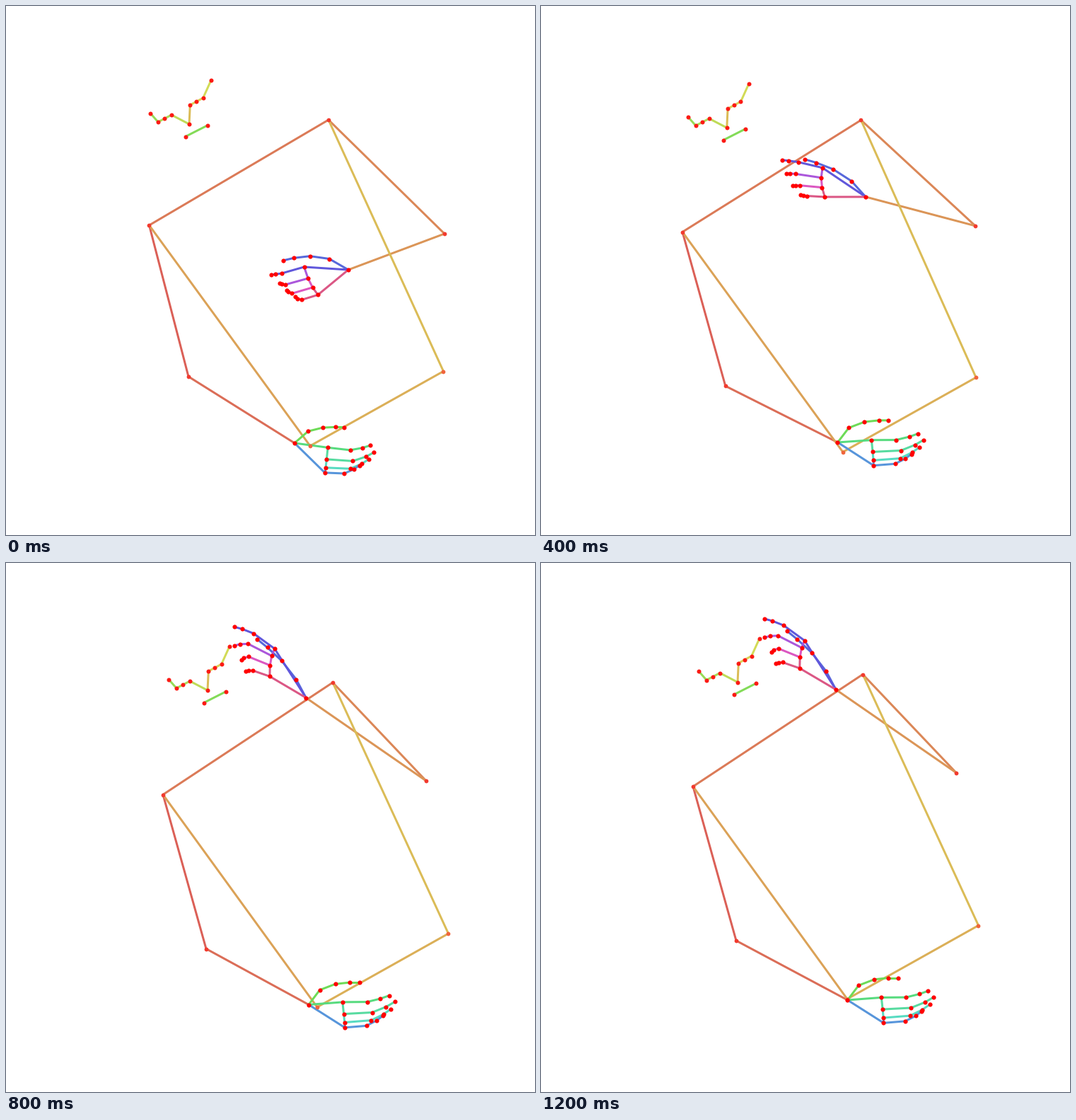
Animation of 748x748 px, one loop 1.28 s. Source, as a matplotlib script:

```python
import colorsys

import matplotlib.pyplot as plt
import numpy as np
from matplotlib.animation import FuncAnimation
from matplotlib.collections import LineCollection

SIZE, DPI = 748, 100
FRAMES, INTERVAL = 16, 80
PX = 72 / DPI

# The near shoulder carries the whole body; the resting wrist drifts by itself.
KEY_TIMES = [0, 3, 5, 7, 10, 13, 15]
SHOULDER_PATH = [(202.5, 310), (200, 315.5), (200, 319.5), (203.5, 314),
                 (222, 327.5), (219.5, 323.5), (215, 316)]
REST_WRIST_PATH = [(408, 618), (409.5, 617.5), (419.5, 617), (424, 618),
                   (428, 624.5), (434, 623), (433.5, 618)]

# Offsets from the nose: one eye to its ear, the other eye to its ear, mouth corners
FACE = np.array([(1.3, -27), (19.7, -37), (31, -62),
                 (-25, -13), (-44, -3), (-55, -15.5),
                 (-5, 17.5), (26.5, 1.5)])

# Thumb to little finger: knuckle distance and bearing from the wrist,
# finger length, heading, curl, share of the first segment
REST_HAND = np.array([
    (25.9, -53, 57.7, -21, 21, 0.41),
    (48, -4.3, 67, -0.5, -19, 0.52),
    (51.3, 14.8, 75.7, -3, -27, 0.53),
    (56.6, 26.3, 70, -4.5, -31, 0.54),
    (60.4, 32.4, 57.8, -4.7, -32, 0.53),
])
REST_TILT = np.array([-0.5, 12, -6, 7, -5, 0])
WAVE_LOW = np.array([
    (31, 210, 65.8, 188, -21, 0.42),
    (62.6, 183.7, 47.5, 164, 10, 0.68),
    (58.2, 168, 41.5, 164.5, 40, 0.81),
    (56.3, 153.7, 39.5, 163.7, 60, 0.77),
    (55.7, 140.5, 33.8, 163, 50, 0.71),
])
WAVE_HIGH = np.array([
    (29.4, 242, 79.5, 232, -13, 0.42),
    (82.2, 237.4, 65.7, 216, -21, 0.56),
    (76.5, 230.7, 56.7, 207, -42, 0.66),
    (68.4, 222, 44, 202, -58, 0.75),
    (59.5, 210.5, 35, 199, -32, 0.73),
])

LOW_WRIST, HIGH_WRIST = 2, 5
FACE_START, LOW_START, HIGH_START = 8, 17, 37
BODY_BONES = [(0, 1), (1, 2), (0, 3), (3, 4), (4, 5), (0, 6), (6, 7), (3, 7)]
FACE_BONES = [(8, 9), (9, 10), (10, 11), (8, 12), (12, 13), (13, 14), (15, 16)]
BODY_DOTS, HIP_DOTS = [0, 1, 3, 4], [6, 7]


def ease(frame, start, end):
    u = np.clip((frame - start) / (end - start), 0, 1)
    return u * u * (3 - 2 * u)


def mix(a, b, amount):
    return np.asarray(a) * (1 - amount) + np.asarray(b) * amount


def follow(path, frame):
    return np.array([np.interp(frame, KEY_TIMES, axis) for axis in zip(*path)])


def polar(length, degrees):
    angle = np.radians(degrees)
    return np.stack([length * np.cos(angle), length * np.sin(angle)], axis=-1)


def hand_points(wrist, hand):
    """Four joints per finger, each finger bending steadily towards its tip."""
    points = []
    for reach, bearing, length, heading, curl, share in hand:
        segments = length * np.array([share, 0.6 * (1 - share), 0.4 * (1 - share)])
        steps = polar(segments, heading + curl * np.array([0, 0.7, 1]))
        knuckle = wrist + polar(reach, bearing)
        points += [knuckle, *(knuckle + np.cumsum(steps, axis=0))]
    return points


def joints(frame):
    turn = ease(frame, 1, 5.5)
    lift = ease(frame, 4, 10)
    rise = ease(frame, 0.5, 8.8)
    sweep = ease(frame, 2.2, 10.2)

    shoulder = follow(SHOULDER_PATH, frame)
    elbow = shoulder + mix((55.5, 214), (61, 218), turn)
    rest_wrist = follow(REST_WRIST_PATH, frame)
    far_shoulder = shoulder + (253.5 - 13.5 * lift, -149 - 9.5 * turn)
    far_elbow = far_shoulder + (164 - 32 * lift, 161 - 11 * turn - 11 * lift)
    wave_wrist = shoulder + (281.5 - 79.5 * sweep, 63 - 200 * rise)
    hip = shoulder + mix((227.5, 312), (218, 300.5), lift)
    far_hip = hip + mix((188.5, -105.5), (185.5, -104), lift)
    nose = shoulder + mix((56.5, -143), (63, -147.5), turn)

    return np.array([
        shoulder, elbow, rest_wrist, far_shoulder, far_elbow, wave_wrist, hip, far_hip,
        nose, *(nose + FACE),
        *hand_points(rest_wrist, REST_HAND + REST_TILT * (1 - turn)),
        *hand_points(wave_wrist, mix(WAVE_LOW, WAVE_HIGH, rise)),
    ])


def hand_bones(wrist, start):
    """Five bones for each finger: a palm bone, three segments and an edge to the wrist."""
    bones = []
    for finger in range(5):
        knuckle = start + 4 * finger
        bones.append((wrist if finger < 2 else knuckle - 4, knuckle))
        bones += [(knuckle + j, knuckle + j + 1) for j in range(3)]
    return bones + [(wrist, start + 16)]


def finger_hues(*hues):
    return [*np.repeat(hues, 4), hues[-1]]


def shade(hue):
    return colorsys.hls_to_rgb(hue / 360, 0.6, 0.65)


BONES = np.array(BODY_BONES + FACE_BONES
                 + hand_bones(LOW_WRIST, LOW_START) + hand_bones(HIGH_WRIST, HIGH_START))
HUES = [
    *np.linspace(4, 46, len(BODY_BONES)),
    *np.linspace(46, 100, len(FACE_BONES)),
    *finger_hues(110, 138, 153, 168, 212),
    *finger_hues(232, 244, 278, 312, 339),
]

fig = plt.figure(figsize=(SIZE / DPI, SIZE / DPI), dpi=DPI, facecolor="white")
ax = fig.add_axes([0, 0, 1, 1])
ax.set_xlim(0, SIZE)
ax.set_ylim(SIZE, 0)
ax.axis("off")

lines = LineCollection([], colors=[shade(h) for h in HUES], linewidths=3 * PX, capstyle="round")
ax.add_collection(lines)


def dot_layer(color, size):
    return ax.plot([], [], "o", color=color, markersize=size * PX, markeredgewidth=0, zorder=3)[0]


hip_dots = dot_layer("#f0643c", 5.8)
body_dots = dot_layer("#f23a2e", 5.8)
face_dots = dot_layer("#fb1a14", 6)
hand_dots = dot_layer("#ff0000", 6.2)


def update(frame):
    pts = joints(frame)
    mid_eyes = (pts[[9, 12]] + pts[[10, 13]]) / 2
    lines.set_segments(pts[BONES])
    hip_dots.set_data(*pts[HIP_DOTS].T)
    body_dots.set_data(*pts[BODY_DOTS].T)
    face_dots.set_data(*np.vstack([pts[FACE_START:LOW_START], mid_eyes]).T)
    hand_dots.set_data(*np.vstack([pts[[LOW_WRIST, HIGH_WRIST]], pts[LOW_START:]]).T)
    return lines, hip_dots, body_dots, face_dots, hand_dots


anim = FuncAnimation(fig, update, frames=FRAMES, interval=INTERVAL, repeat=True, repeat_delay=0)
plt.show()
```
